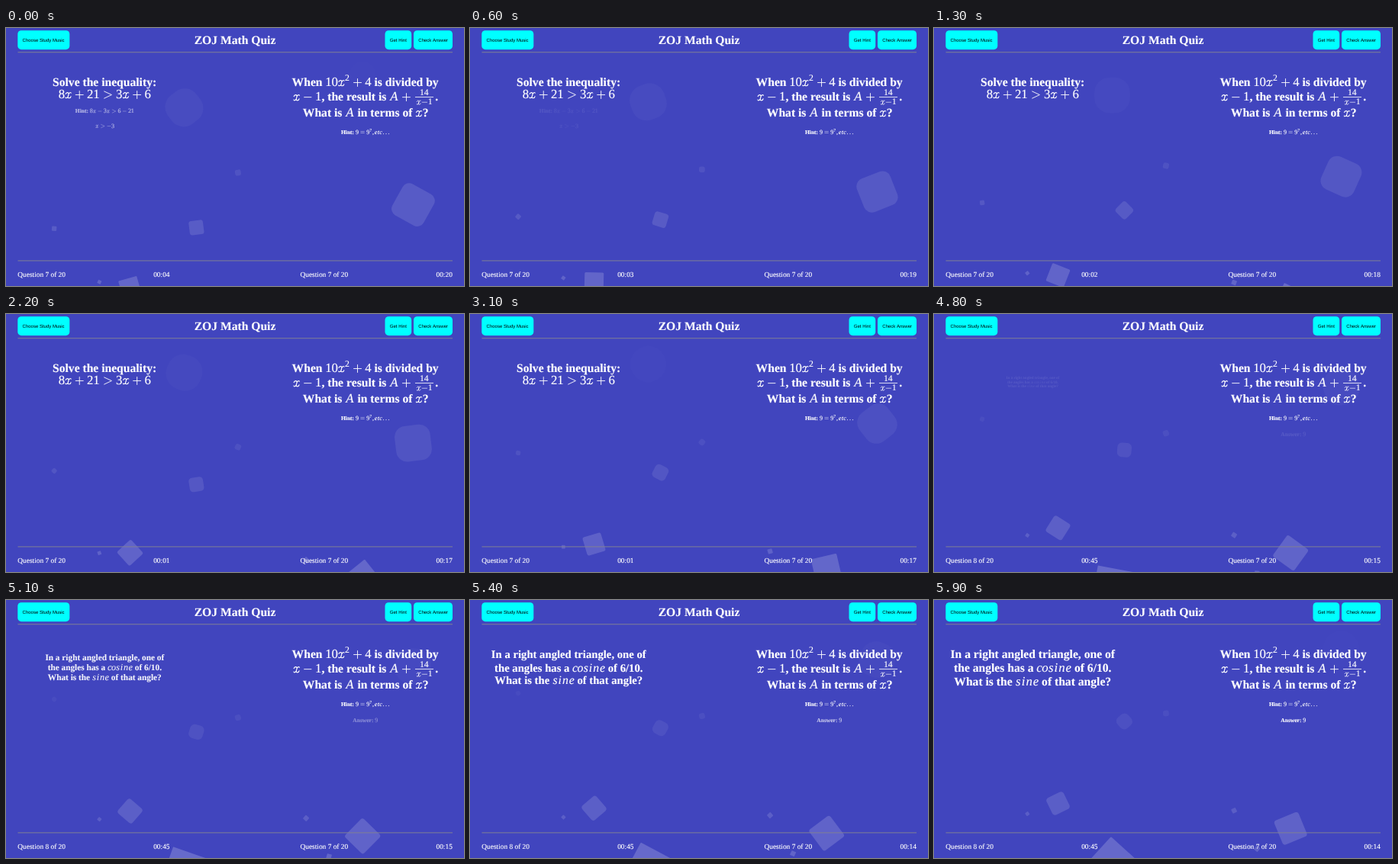
An HTML page for the animation above (6000 ms loop, 600x338 px).

```html
<!DOCTYPE html>
<html lang="en">
<head>
<meta charset="utf-8">
<title>Math Quiz</title>
<style>
  html, body { margin: 0; height: 100%; overflow: hidden; background: #4145be; }
  svg { display: block; width: 100vw; height: 100vh; text-rendering: geometricPrecision; font-kerning: none; }
  text { font-family: "Liberation Serif", Times, serif; fill: #fff; stroke: #fff; stroke-width: .15; white-space: pre; }
  .bold { font-weight: bold; }
  .italic { font-style: italic; }
  .button { font-family: "Liberation Sans", Arial, sans-serif; fill: #000; stroke: none; font-size: 6px; }
  path { fill: none; stroke: #fff; stroke-width: .055; }
</style>
</head>
<body>
<svg id="stage" viewBox="0 0 600 338"></svg>
<script>
const stage = document.getElementById('stage');
const LOOP = 6000, STEP = 100, SCALE = 0.3125, BUBBLE_CLOCK = 1302.57;

function add(parent, tag, attrs = {}, content = '') {
  const node = document.createElementNS('http://www.w3.org/2000/svg', tag);
  for (const key in attrs) node.setAttribute(key, attrs[key]);
  node.textContent = content;
  return parent.appendChild(node);
}
const group = () => add(stage, 'g');
const label = (x, y, content, size = 9.375, cls = '') =>
  add(stage, 'text', { x, y, 'font-size': size, class: cls }, content);

// Math layout: advances and stroked shapes in em units
const ADVANCE = { x: .572, A: .75, c: .433, o: .485, s: .469, i: .345, n: .6, e: .466,
  t: .361, ',': .445, '.': .445, '+': .778, '-': .778, '>': .778, '=': .778 };
const PAD = { '+': .222, '-': .222, '>': .278, '=': .278 };
const SHAPE = {
  '+': 'M.06-.25H.72M.39-.58V.08',
  '-': 'M.08-.25H.7',
  '>': 'M.08-.54L.7-.25L.08.04',
  '=': 'M.06-.37H.72M.06-.13H.72',
  x: 'M.06-.29C.1-.4 .17-.43 .21-.43C.3-.43 .33-.37 .31-.29L.26-.1C.23-.02 .17.01 .12.01C.07.01 .05-.03 .08-.06' +
     'M.51-.37C.53-.41 .49-.43 .45-.43C.38-.43 .33-.37 .31-.29L.26-.1C.24-.02 .29.01 .35.01C.43.01 .49-.06 .51-.14'
};

function math(parent, formula, x, y, size, tight = false) {
  let previous = '', raised = false;
  for (const ch of formula) {
    if (ch === '^') { raised = true; continue; }
    const em = raised ? size * .7 : size;
    const base = raised ? y - size * .38 : y;
    const width = (ADVANCE[ch] || .5) * em;
    const pad = tight || (ch === '-' && previous === '>') ? 0 : (PAD[ch] || 0) * em;
    x += pad;
    if (SHAPE[ch]) {
      add(parent, 'path', { d: SHAPE[ch], transform: `translate(${x} ${base}) scale(${em})`,
        style: ch === 'x' ? 'stroke-width:.07' : '' });
    } else {
      add(parent, 'text', { x: x + width / 2, y: base, 'font-size': em * 1.03, 'text-anchor': 'middle',
        class: /[a-z]/i.test(ch) ? 'italic' : '' }, ch);
    }
    x += width + pad + (raised ? size * .05 : 0);
    previous = ch;
    raised = false;
  }
  return x;
}

// Bold text with formulas between dollar signs
function row(parent, x, y, content, size = 15.625) {
  content.split('$').forEach((part, i) => {
    if (i % 2) {
      x = math(parent, part, x, y, size * 1.043);
    } else if (part) {
      x += add(parent, 'text', { x, y, 'font-size': size, class: 'bold' }, part).getComputedTextLength();
    }
  });
}

// left share, size, duration, delay
const bubbles = [
  [.25, 80, 25, 0], [.1, 20, 12, 2], [.7, 20, 25, 4], [.4, 60, 18, 0], [.65, 20, 25, 0],
  [.75, 110, 25, 3], [.35, 150, 25, 7], [.5, 25, 45, 15], [.2, 15, 35, 2], [.85, 150, 11, 0]
].map(([left, side, duration, delay]) => {
  const size = side * SCALE;
  const node = add(stage, 'rect', { x: -size / 2, y: -size / 2, width: size, height: size, fill: '#fff' });
  return { node, size, duration, delay, x: left * 600 + size / 2 };
});

for (const y of [31.3, 304.4])
  add(stage, 'rect', { x: 15.5, y, width: 569.5, height: 1, fill: '#808094' });
for (const [x, width, textX, content] of [
  [15.3, 68, 21.6, 'Choose Study Music'], [496.5, 34.7, 502.8, 'Get Hint'], [534, 51, 540.3, 'Check Answer']]) {
  add(stage, 'rect', { x, y: 3.2, width, height: 25, rx: 4.7, fill: '#0ff' });
  label(textX, 18, content, 6, 'button');
}
label(300, 20.7, 'ZOJ Math Quiz', 15.625, 'bold').setAttribute('text-anchor', 'middle');

const leftCount = label(15.3, 326.2, '');
const leftClock = label(193.2, 326.2, '');
label(385.5, 326.2, 'Question 7 of 20');
const rightClock = label(563.5, 326.2, '');

const oldQuestion = group();
row(oldQuestion, 61, 75.6, 'Solve the inequality:');
row(oldQuestion, 68.8, 91.6, '$8x+21>3x+6$');

const leftHint = group();
row(leftHint, 90.8, 111, 'Hint: $8x-3x>6-21$', 7.5);
row(leftHint, 117, 130.5, '$x>-3$', 7.5);

const newQuestion = group();
row(newQuestion, 21.5, 75.6, 'In a right angled triangle, one of');
row(newQuestion, 26, 93.8, 'the angles has a $cosine$ of 6/10.');
row(newQuestion, 26.3, 111.6, 'What is the $sine$ of that angle?');

const rightQuestion = group();
row(rightQuestion, 374.6, 75.6, 'When $10x^2+4$ is divided by');
row(rightQuestion, 376, 94.7, '$x-1$, the result is $A+$');
math(rightQuestion, '14', 542.1, 88, 11.4);
add(rightQuestion, 'path', { d: 'M536 90.5H560', style: 'stroke-width:.8' });
math(rightQuestion, 'x-1', 537.4, 100.1, 11.4, true);
row(rightQuestion, 562.3, 94.7, '.');
row(rightQuestion, 388.8, 115.6, 'What is $A$ in terms of $x$?');
row(rightQuestion, 439, 138.5, 'Hint: $9=9^7,etc...$', 7.5);

const answer = group();
row(answer, 454.3, 159.5, 'Answer: $9$', 7.5);

const clamp = v => Math.min(1, Math.max(0, v));
const swing = v => .5 - Math.cos(clamp(v) * Math.PI) / 2;

// The standard CSS "ease" curve
function ease(v) {
  const bezier = (a, b, u) => 3 * a * u * (1 - u) ** 2 + 3 * b * u * u * (1 - u) + u ** 3;
  let low = 0, high = 1;
  for (let i = 0; i < 20; i++) {
    const mid = (low + high) / 2;
    if (bezier(.25, .25, mid) < clamp(v)) low = mid; else high = mid;
  }
  return bezier(.1, 1, low);
}

function zoom(node, cy, scale, opacity) {
  node.setAttribute('transform', `translate(129.5 ${cy}) scale(${scale}) translate(-129.5 ${-cy})`);
  node.setAttribute('opacity', opacity);
}
const clock = seconds => '00:' + String(seconds).padStart(2, '0');

function render(ms) {
  const t = ms / 1000;
  for (const { node, size, duration, delay, x } of bubbles) {
    const p = (BUBBLE_CLOCK + t - delay) / duration % 1;
    const y = 338 + 150 * SCALE - size / 2 - 1000 * SCALE * p;
    node.setAttribute('transform', `translate(${x} ${y}) rotate(${720 * p})`);
    node.setAttribute('rx', size * p / 2);
    node.setAttribute('opacity', .2 * (1 - p));
  }

  const ticks = Math.floor((ms + 800) / 1000);
  const next = ms >= 4700;
  leftCount.textContent = `Question ${next ? 8 : 7} of 20`;
  leftClock.textContent = clock(next ? 45 : Math.max(0, 4 - ticks));
  rightClock.textContent = clock(20 - ticks);

  const out = ease((t - 3.2) * 2);
  zoom(oldQuestion, 79, 1 - .7 * out, t < 3.7 ? 1 - out : 0);
  const into = t - 4.75;
  zoom(newQuestion, 89, .3 + .7 * ease(into), into > 0 ? ease(into * 2) : 0);
  leftHint.setAttribute('opacity', 1 - swing((t + .6) / 1.5));
  answer.setAttribute('opacity', swing((t - 4.5) / 1.4));
}

function loop() {
  render(Math.floor(performance.now() % LOOP / STEP) * STEP);
  requestAnimationFrame(loop);
}
loop();
</script>
</body>
</html>
```
